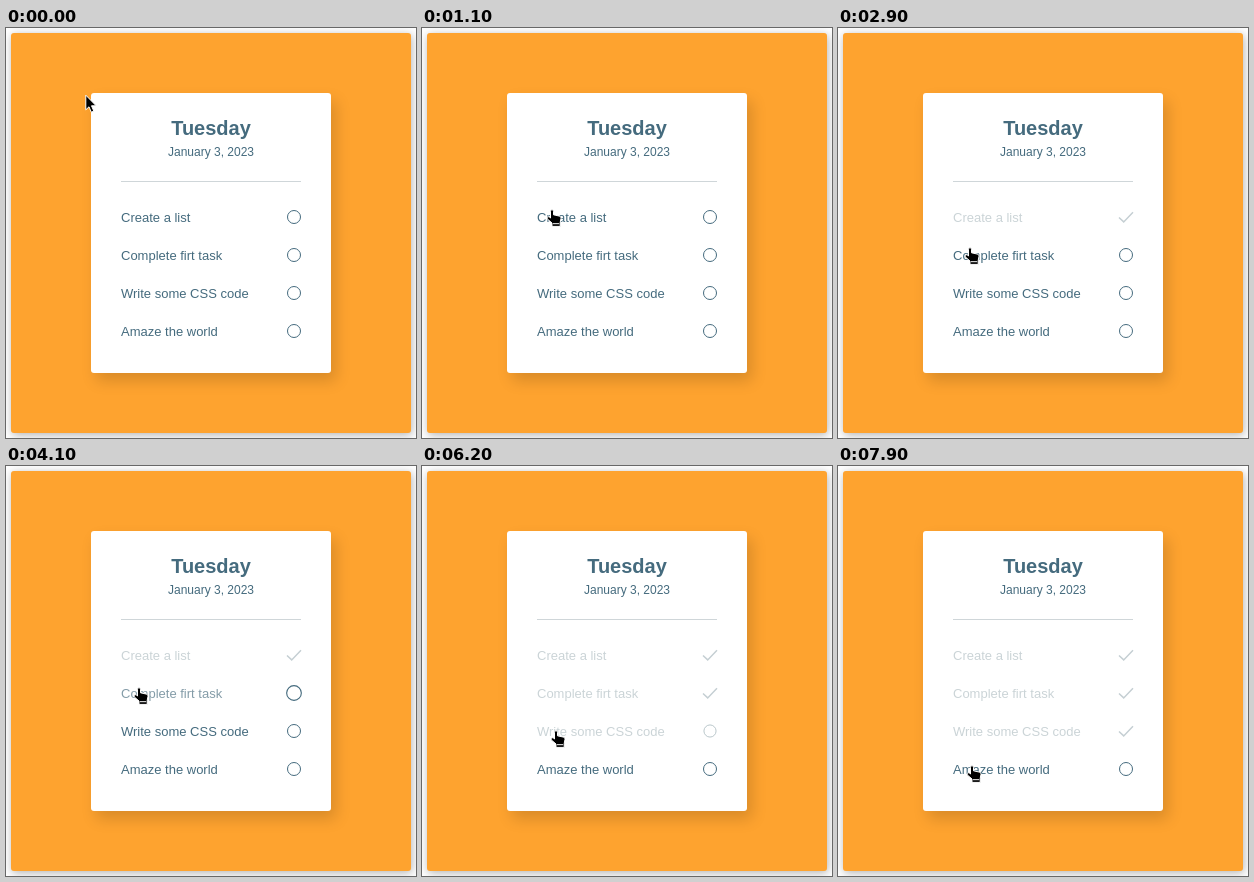
An HTML page for the animation above (8 s loop, 410 by 410 pixels).

```html
<!DOCTYPE html>
<html lang="en">
<head>
<meta charset="utf-8">
<title>To-do list</title>
<style>
  html, body { margin: 0; width: 100%; height: 100%; overflow: hidden; background: #fff; }
  div, svg { position: absolute; }
  .frame { left: 5px; top: 5px; width: 400px; height: 400px; border-radius: 3px;
    background: #fea32f; box-shadow: 1px 2px 10px rgba(0, 0, 0, .3); }
  .card { left: 85px; top: 65px; width: 240px; height: 280px; border-radius: 3px;
    background: #fff; box-shadow: 5px 8px 15px rgba(0, 0, 0, .15); }
  svg { left: 0; top: 0; }
  text { font: 13px "Liberation Sans", Arial, sans-serif; fill: #456b7e; }
  .day { font-size: 20px; font-weight: bold; text-anchor: middle; }
  .date { font-size: 12px; text-anchor: middle; }
  .ring, .tick { fill: none; }
  .tick { stroke: #c5cfd3; stroke-width: 1.5; }
  .cursor { stroke: #fff; stroke-width: 1; stroke-linejoin: round; }
</style>
</head>
<body>
<div class="frame"></div>
<div class="card"></div>
<svg width="410" height="410" viewBox="0 0 410 410">
  <text class="day" x="205" y="107">Tuesday</text>
  <text class="date" x="205" y="128">January 3, 2023</text>
  <rect x="115" y="153" width="180" height="1" fill="#cfd6d9"/>
  <g id="list"></g>
  <path id="arrow" class="cursor" d="M.8 1.2V15.8L4 12.8L6.3 18.2L8.8 17.1L6.5 11.8H11.2Z"/>
  <g id="hand" class="cursor">
    <path d="M4.5 2.4C4.5 .3 7.5 .3 7.5 2.4V5.8L13 7C14.4 7.3 15 8.1 15 9.3L14.2 13.5V17.4H6V14L1.3 9.9C.4 8.5 1.9 7.2 3.3 8L4.5 9Z"/>
    <path d="M7 14.7H13.2" fill="none"/>
  </g>
</svg>
<script>
const LOOP = 8000, STEP = 100;
const DARK = [69, 107, 126], PALE = [203, 212, 215];
const byId = id => document.getElementById(id);
const clamp = v => Math.max(0, Math.min(1, v));
const ease = v => v * v * (3 - 2 * v);

// Piecewise linear track of [time, ...values].
function track(keys, t) {
  const i = keys.findIndex(k => k[0] > t);
  if (i === 0) return keys[0].slice(1);
  if (i < 0) return keys[keys.length - 1].slice(1);
  const a = keys[i - 1], b = keys[i];
  const p = (t - a[0]) / (b[0] - a[0]);
  return a.slice(1).map((v, n) => v + (b[n + 1] - v) * p);
}

function mix(p) {
  return `rgb(${DARK.map((v, i) => Math.round(v + (PALE[i] - v) * clamp(p)))})`;
}

function add(parent, tag, attrs, text = "") {
  const node = document.createElementNS("http://www.w3.org/2000/svg", tag);
  for (const key in attrs) node.setAttribute(key, attrs[key]);
  node.textContent = text;
  return parent.appendChild(node);
}

const tasks = [
  ["Create a list", 1900],
  ["Complete firt task", 3900],
  ["Write some CSS code", 5800],
  ["Amaze the world", Infinity]
].map(([name, start], i) => {
  const y = 189 + i * 38, list = byId("list");
  return {
    start,
    label: add(list, "text", { x: 115, y: y + 5 }, name),
    ring: add(list, "circle", { class: "ring", cx: 288, cy: y }),
    tick: add(list, "path", { class: "tick", pathLength: 1, d: `M281 ${y + .5}l4.7 4.4l9.3-9.6` })
  };
});

const handKeys = [
  [900, 123, 177], [1100, 124, 181], [1300, 126, 186], [1400, 126, 185],
  [1900, 126, 185], [2000, 126, 184], [2800, 126, 184], [2900, 126, 219],
  [3400, 126, 219], [3500, 127, 221], [4400, 127, 221], [4600, 128, 239],
  [4700, 128, 237], [4800, 128, 237], [5100, 128, 258], [5300, 127, 261],
  [5400, 127, 261], [5600, 128, 264], [6800, 128, 264], [6900, 129, 280],
  [7000, 129, 278], [7100, 129, 278], [7700, 127, 297], [7800, 127, 297],
  [7900, 128, 299]
];
const ringKeys = [[0, 1], [100, 1.03], [200, 1.13], [350, 1.4], [500, 0]];

function place(node, [x, y], visible) {
  node.setAttribute("transform", `translate(${Math.round(x)} ${Math.round(y)})`);
  node.style.display = visible ? "" : "none";
}

function render(time) {
  const t = Math.floor((time % LOOP) / STEP) * STEP;
  for (const { start, label, ring, tick } of tasks) {
    const p = Math.max(0, t - start);
    const scale = track(ringKeys, p)[0];
    const drawn = clamp((p - 400) / 200);
    label.style.fill = mix((p - 60) / 300);
    ring.setAttribute("r", 6.5 * scale);
    ring.style.stroke = mix((p - 200) / 240);
    ring.style.strokeWidth = scale;
    tick.style.strokeDasharray = `${drawn} 2`;
    tick.style.display = drawn ? "" : "none";
  }
  const glide = ease(clamp(t / 700));
  place(byId("arrow"), [79 + 46 * glide, 66 + 111 * glide], t < 900);
  place(byId("hand"), track(handKeys, t), t >= 900);
}

let origin;
function tick(now) {
  origin ??= now;
  render(now - origin);
  requestAnimationFrame(tick);
}
render(0);
requestAnimationFrame(tick);
</script>
</body>
</html>
```
